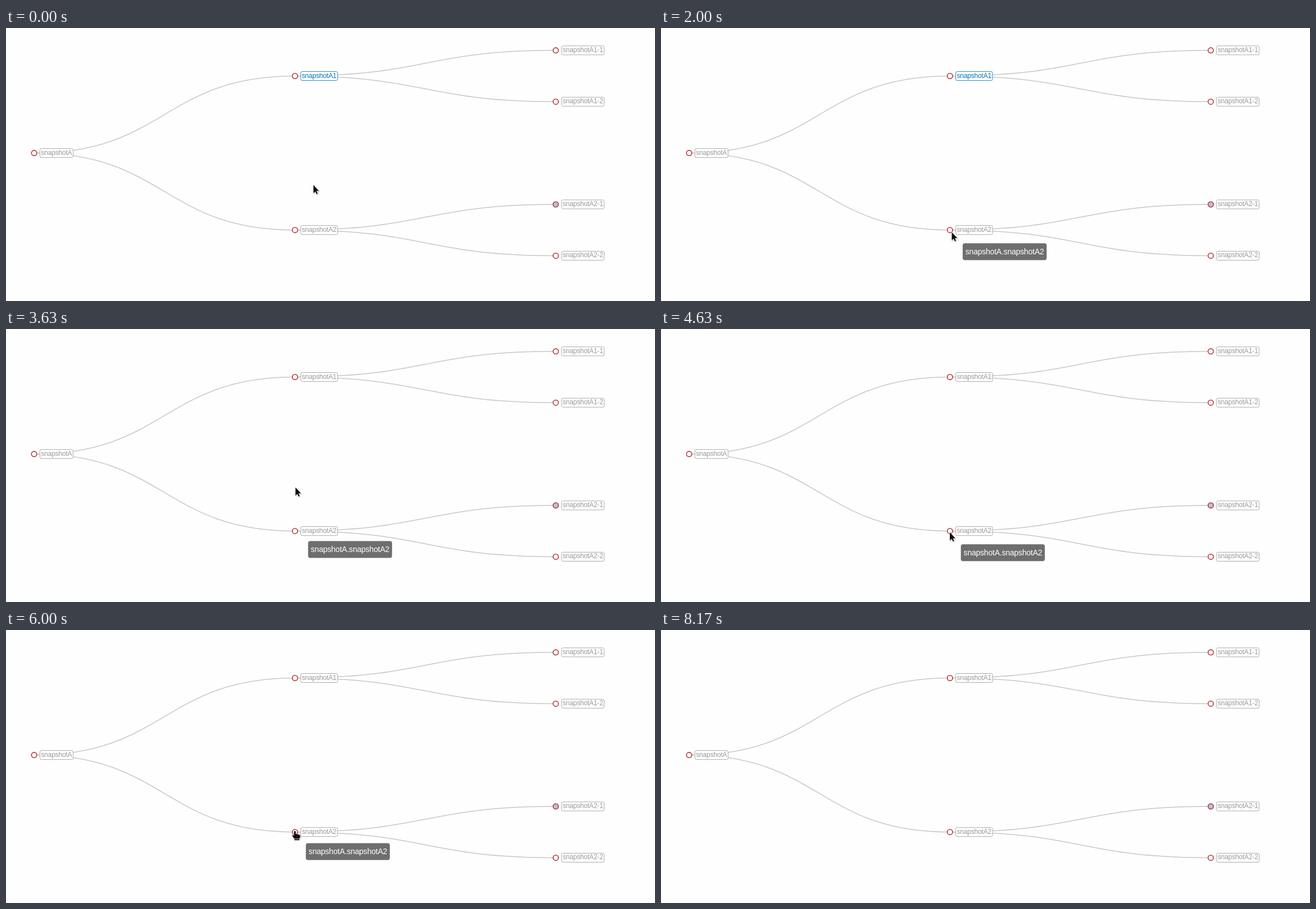
These frames come from a looping animation (1153x486 px, 8500 ms). An HTML page with a canvas:

```html
<!DOCTYPE html>
<html lang="en">
<head>
<meta charset="utf-8">
<title>Snapshot tree</title>
<style>
  html, body { margin: 0; width: 100%; height: 100%; overflow: hidden; background: #fefefe; }
  canvas { display: block; width: 1153px; height: 486px; }
</style>
</head>
<body>
<canvas id="stage" width="1153" height="486"></canvas>
<script>
const ctx = document.getElementById('stage').getContext('2d');
const LOOP = 8500;
const CLICK = 2540;
const POINTER_GONE = 8165;
const TOOLTIP_GAP = 19.5;

const lerp = (a, b, p) => a + (b - a) * p;
const progress = (t, from, to) => Math.min(1, Math.max(0, (t - from) / (to - from)));
const easeInOut = p => p < 0.5 ? 4 * p ** 3 : 1 - 4 * (1 - p) ** 3;
const easeOut = p => 1 - (1 - p) ** 5;

// Columns by depth, rows in equal steps from the root
const node = (name, depth, row, parent) =>
  ({ name, x: 50 + 463.35 * depth, y: 222.6 + 45.7 * row, parent });
const root = node('snapshotA', 0, 0);
const nodes = [root];
const branches = [-3, 3].map((row, i) => {
  const branch = node(root.name + (i + 1), 1, row, root);
  nodes.push(branch);
  [-1, 1].forEach((step, j) => nodes.push(node(`${branch.name}-${j + 1}`, 2, row + step, branch)));
  return branch;
});
const [first, second] = branches;
const folded = nodes.find(n => n.name === 'snapshotA2-1');

const pointerStart = { x: 546.2, y: 279.5 };
const pointerMoves = [
  [190, 500, 576, 73],
  [770, 1240, 511, 409],
  [1240, 1420, 510.5, 365],
  [1710, 1900, 516.6, 363.5],
  [3510, 3630, 514.3, 282],
  [3670, 3710, 512, 275],
  [4060, 4380, 513.2, 362],
  [4710, 4830, 511, 413],
  [5020, 5300, 513.7, 360],
  [6030, 6540, 504, 270],
  [6690, 7000, 513.5, 363],
  [7190, 7540, 371, 256],
  [7650, 8150, 60, 5]
].map(([from, to, x, y]) => ({ from, to, x, y }));

// Times over the lower branch; each tooltip glides from the last spot to its own
const tooltipStart = { x: 560.8, y: 188.3 };
const visits = [
  { from: 1670, to: 3540, x: 516.4, y: 363.7, handFrom: 2330 },
  { from: 3540, to: 3690, x: 517.8, y: 353 },
  { from: 4210, to: 4800, x: 513.2, y: 363.7 },
  { from: 5260, to: 6160, x: 513.2, y: 360, handFrom: 5260 },
  { from: 6930, to: 7290, x: 513.2, y: 364, handFrom: 6930 }
];

function pointerAt(t) {
  return pointerMoves.reduce((at, move) => {
    const p = progress(t, move.from, move.to);
    return { x: lerp(at.x, move.x, p), y: lerp(at.y, move.y, p) };
  }, pointerStart);
}

function paint(fill, stroke, width) {
  ctx.fillStyle = fill;
  ctx.fill();
  if (!stroke) return;
  ctx.strokeStyle = stroke;
  ctx.lineWidth = width;
  ctx.stroke();
}

function setFont(size) {
  ctx.font = `${size}px "Liberation Sans", Arial, sans-serif`;
  ctx.letterSpacing = `${-0.016 * size}px`;
}

function drawEdge(from, to) {
  const mid = (from.x + to.x) / 2;
  ctx.globalAlpha = to.scale;
  ctx.strokeStyle = '#c8c8c8';
  ctx.lineWidth = 1.5;
  ctx.beginPath();
  ctx.moveTo(from.x, from.y);
  ctx.bezierCurveTo(mid, from.y, mid, to.y, to.x, to.y);
  ctx.stroke();
  ctx.globalAlpha = 1;
}

function drawNode({ name, x, y, scale }, isFolded, isActive) {
  ctx.beginPath();
  ctx.arc(x, y, 4.7 * scale, 0, 2 * Math.PI);
  paint(isFolded ? '#b0c4de' : '#fff', '#b8353a', 1.6);
  setFont(12);
  ctx.beginPath();
  ctx.roundRect(x + 10.3, y - 8, ctx.measureText(name).width + 3.9, 16, 2.5);
  paint('#fff', isActive ? '#2a8fc8' : '#aaa', 1);
  ctx.fillStyle = isActive ? '#0072b8' : '#999';
  ctx.fillText(name, x + 12.2, y + 3);
}

function drawTooltip(t, visit) {
  const last = visits[visits.indexOf(visit) - 1] || tooltipStart;
  const p = easeOut(progress(t, visit.from + 40, visit.from + 400));
  const x = lerp(last.x, visit.x, p) + TOOLTIP_GAP;
  const y = lerp(last.y, visit.y, p) + TOOLTIP_GAP;
  const text = 'snapshotA.snapshotA2';
  setFont(14);
  ctx.beginPath();
  ctx.roundRect(x, y, ctx.measureText(text).width + 9.7, 30, 3.9);
  paint('rgba(50, 50, 50, 0.7)');
  ctx.fillStyle = '#fff';
  ctx.fillText(text, x + 4.9, y + 19.5);
}

const arrow = new Path2D('M0 0V14.5L3.3 11.4L5.4 16.2L7.4 15.3L5.4 10.6H9.6Z');
const hand = new Path2D('M-2-1Q-.5-3.5 1-1V3.5Q2.5 2.2 4 4Q5.5 3 6.5 4.6' +
  'Q8.6 4.2 8.8 6.5V9L7.5 11.5H-1.5L-5 6.8Q-5.6 4.6-3.6 5L-2 6.4Z');

function drawPointer(t, isHand) {
  const { x, y } = pointerAt(t);
  const shape = isHand ? hand : arrow;
  ctx.save();
  ctx.translate(x, y);
  ctx.shadowColor = 'rgba(0, 0, 0, 0.4)';
  ctx.shadowBlur = 2;
  ctx.shadowOffsetX = ctx.shadowOffsetY = 1;
  ctx.lineWidth = 1;
  ctx.strokeStyle = '#fff';
  ctx.stroke(shape);
  ctx.shadowColor = 'transparent';
  ctx.fillStyle = '#0a0a0a';
  ctx.fill(shape);
  if (isHand) ctx.fillRect(-1.5, 12.4, 9, 1.8);
  ctx.restore();
}

function draw(t) {
  const regrow = t < CLICK ? 1 : easeInOut(progress(t, CLICK + 40, CLICK + 720));
  const active = t < CLICK ? first : t < visits[0].to ? second : null;
  const visit = visits.find(v => t >= v.from && t < v.to);
  const placed = nodes.map(n => {
    const scale = n.parent === second ? regrow : 1;
    const from = n.parent || n;
    return { ...n, scale, x: lerp(from.x, n.x, scale), y: lerp(from.y, n.y, scale) };
  });
  ctx.fillStyle = '#fefefe';
  ctx.fillRect(0, 0, 1153, 486);
  placed.forEach(n => n.parent && drawEdge(n.parent, n));
  placed.forEach((n, i) => drawNode(n, nodes[i] === folded, nodes[i] === active));
  if (visit) drawTooltip(t, visit);
  if (t < POINTER_GONE) drawPointer(t, visit && t >= visit.handFrom);
}

const start = performance.now();
function tick() {
  draw((performance.now() - start) % LOOP);
  requestAnimationFrame(tick);
}
tick();
</script>
</body>
</html>
```
